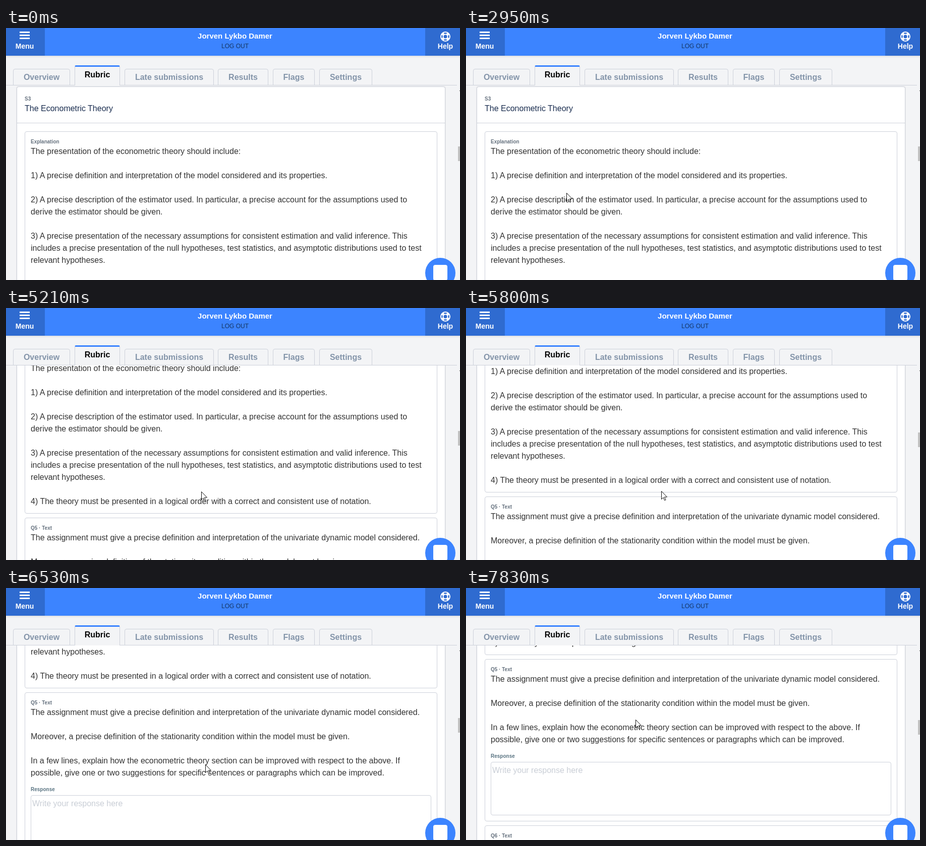
Recreate the animation shown at these times as an HTML page. Size 900x500 px, loop 8 s.

```html
<!DOCTYPE html>
<html lang="en">
<head>
<meta charset="utf-8">
<title>Rubric</title>
<style>
  html, body { margin: 0; width: 100%; height: 100%; overflow: hidden; }
  body { position: relative; background: #f3f4f6; color: #333; font: 16px/24px "Liberation Sans", Arial, sans-serif; }
  body *, svg { position: absolute; box-sizing: border-box; }
  header { left: 0; top: 0; width: 900px; height: 55px; background: #3c84ff; box-shadow: 0 1px 4px #0002; text-align: center; }
  header div { left: 0; width: 908px; white-space: nowrap; }
  .user { top: 4px; color: #fff; font-weight: bold; font-size: 15px; }
  .logout { top: 24px; color: #173763; font-size: 12px; }
  header .side { top: 0; height: 55px; background: #2f6bd0; color: #fff; font: bold 14px/72px "Liberation Sans", Arial, sans-serif; }
  .tabs { left: 0; top: 113px; width: 894px; height: 1px; background: #cdd1da; }
  .tab { top: 81px; height: 33px; border: 1px solid #cdd1da; border-radius: 4px 4px 0 0; color: #8394a9; font-weight: bold; line-height: 31px; text-align: center; white-space: nowrap; }
  .tab.active { top: 74px; height: 40px; border-top: 3px solid #3c84ff; border-bottom: 0; border-radius: 3px 3px 0 0; background: #f3f4f6; color: #000; }
  .view { left: 0; top: 114px; width: 894px; height: 386px; overflow: hidden; }
  #page { left: 0; top: -114px; width: 894px; height: 1100px; }
  .box { background: #fff; border: 1px solid #cdd1da; border-radius: 4px; }
  .label { font: bold 10px/12px "Liberation Sans", Arial, sans-serif; color: #66727f; white-space: nowrap; }
  .text { left: 49px; white-space: pre; }
  #thumb { left: 896px; top: 235px; width: 4px; height: 29px; background: #c1c1c1; }
  .chat { left: 831px; top: 456px; width: 60px; height: 60px; border-radius: 50%; background: #3c84ff; }
  .chat i { left: 16px; top: 14px; width: 28px; height: 31px; border-radius: 4px; background: #fff; }
  #cursor { left: 0; top: 0; overflow: visible; }
</style>
</head>
<body>
<div class="view"><div id="page">
  <div class="box" style="left:21px;top:116px;width:850px;height:1000px;box-shadow:0 0 2px #0002"></div>
  <div class="label" style="left:37px;top:135px">S3</div>
  <div class="text" style="left:37px;top:148px;color:#1b2e50">The Econometric Theory</div>
  <div style="left:22px;top:188px;width:848px;height:1px;background:#cdd1da"></div>

  <div class="box" style="left:37px;top:205px;width:818px;height:328px"></div>
  <div class="label" style="left:49px;top:220px">Explanation</div>
  <div class="text" style="top:233px">The presentation of the econometric theory should include:

1) A precise definition and interpretation of the model considered and its properties.

2) A precise description of the estimator used. In particular, a precise account for the assumptions used to
derive the estimator should be given.

3) A precise presentation of the necessary assumptions for consistent estimation and valid inference. This
includes a precise presentation of the null hypotheses, test statistics, and asymptotic distributions used to test
relevant hypotheses.

4) The theory must be presented in a logical order with a correct and consistent use of notation.</div>

  <div class="box" style="left:37px;top:541px;width:818px;height:322px"></div>
  <div class="label" style="left:49px;top:556px">Q5 · Text</div>
  <div class="text" style="top:569px">The assignment must give a precise definition and interpretation of the univariate dynamic model considered.

Moreover, a precise definition of the stationarity condition within the model must be given.

In a few lines, explain how the econometric theory section can be improved with respect to the above. If
possible, give one or two suggestions for specific sentences or paragraphs which can be improved.</div>
  <div class="label" style="left:49px;top:728px;color:#5b7583">Response</div>
  <div class="box" style="left:49px;top:745px;width:794px;height:106px"></div>
  <div class="text" style="left:52px;top:750px;color:#c9ced6">Write your response here</div>

  <div class="box" style="left:37px;top:871px;width:818px;height:322px"></div>
  <div class="label" style="left:49px;top:886px">Q6 · Text</div>
</div></div>

<div class="tabs"></div>
<div class="tab" style="left:14px;width:113px">Overview</div>
<div class="tab active" style="left:136px;width:90px">Rubric</div>
<div class="tab" style="left:235px;width:177px">Late submissions</div>
<div class="tab" style="left:420px;width:100px">Results</div>
<div class="tab" style="left:529px;width:83px">Flags</div>
<div class="tab" style="left:621px;width:105px">Settings</div>

<header>
  <div class="user">Jorven Lykbo Damer</div>
  <div class="logout">LOG OUT</div>
  <div class="side" style="left:0;width:77px;padding-right:3px">Menu</div>
  <div class="side" style="left:831px;width:69px;padding-left:11px">Help</div>
  <svg style="left:0;top:0" width="900" height="55" fill="none" stroke="#fff">
    <path d="M27 8.5h20M27 14.5h20M27 20.5h20" stroke-width="3"/>
    <circle cx="871" cy="17" r="9" stroke-width="2"/>
    <circle cx="871" cy="17" r="4.5" stroke-width="2"/>
    <circle cx="871" cy="17" r="6.7" stroke-width="4" pathLength="8" stroke-dasharray="1" stroke-dashoffset="-.5"/>
  </svg>
</header>

<div id="thumb"></div>
<div style="left:899px;top:124px;width:1px;height:1px;background:#222"></div>
<div class="chat"><i></i></div>
<svg id="cursor" width="13" height="20"><path d="M.5 .5V16.5L4.2 13L6.7 18.7L9 17.7L6.5 12H11.5Z" fill="#fff" stroke="#111"/></svg>

<script>
const LOOP = 8000;
const page = document.getElementById('page');
const thumb = document.getElementById('thumb');
const cursor = document.getElementById('cursor');

// Wheel scrolls: start, end, resulting offset
const scrolls = [
  [4020, 4190, 42], [4610, 4780, 83], [5050, 5210, 125],
  [5570, 5740, 167], [5980, 6150, 209], [6190, 6360, 250],
  [6390, 6530, 334], [6560, 6820, 358], [7660, 7830, 400],
];

// Pointer path: time, x, y
const path = [
  [120, 676, 505], [500, 820, 257], [740, 854, 290],
  [1150, 854, 290], [1400, 640, 344], [1780, 128, 285], [1920, 190, 264],
  [1970, 190, 264], [2120, 175, 257], [2480, 304, 270], [2740, 259, 304],
  [2810, 259, 304], [2950, 199, 327],
  [3070, 199, 327], [3370, 335, 390], [3560, 387, 364],
  [5780, 387, 364], [5940, 395, 350],
  [7250, 395, 350], [7480, 336, 261],
];

const clamp = v => Math.max(0, Math.min(1, v));
const easeOut = p => 1 - (1 - p) ** 2;
const easeInOut = p => p * p * (3 - 2 * p);

function scrollAt(t) {
  let y = 0;
  for (const [start, end, target] of scrolls) {
    if (t < start) break;
    y += (target - y) * easeOut(clamp((t - start + 25) / (end - start + 25)));
  }
  return Math.round(y);
}

function pointerAt(t) {
  let [, x, y] = path[0];
  for (let i = 1; i < path.length && t > path[i - 1][0]; i++) {
    const [start, x0, y0] = path[i - 1], [end, x1, y1] = path[i];
    const p = easeInOut(clamp((t - start) / (end - start)));
    x = x0 + (x1 - x0) * p;
    y = y0 + (y1 - y0) * p;
  }
  return [Math.round(x), Math.round(y)];
}

function draw(now) {
  const t = now % LOOP, y = scrollAt(t), [px, py] = pointerAt(t);
  page.style.transform = `translateY(${-y}px)`;
  thumb.style.transform = `translateY(${Math.ceil(y * 27 / 400)}px)`;
  cursor.style.transform = `translate(${px}px, ${py}px)`;
  requestAnimationFrame(draw);
}
requestAnimationFrame(draw);
</script>
</body>
</html>
```
